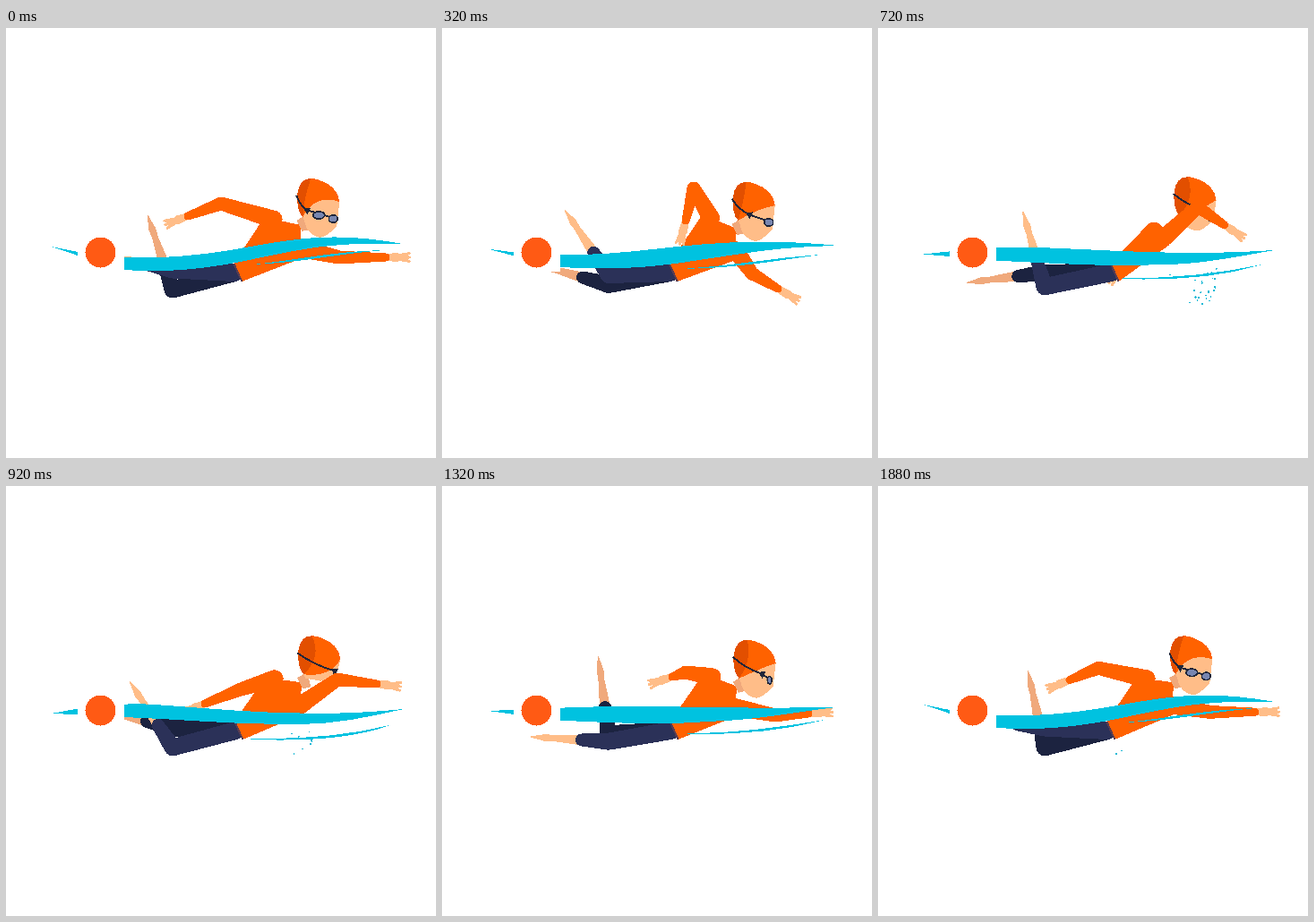
These frames come from a looping animation (480x480 px, 1920 ms). An HTML page:

```html
<!DOCTYPE html>
<html lang="en">
<head>
<meta charset="utf-8">
<title>Swimmer</title>
<style>
html, body { margin: 0; width: 100%; height: 100%; overflow: hidden; background: #fff; }
svg { display: block; width: 100%; height: 100%; }
</style>
</head>
<body>
<svg id="stage" viewBox="0 0 480 480" shape-rendering="crispEdges"></svg>
<script>
const LOOP = 1920, STEP = 40, TURN = 2 * Math.PI;
const ORANGE = '#ff6200', SHADE = '#e24f00', NAVY = '#2b3158', DARK = '#1c2340',
  SKIN = '#ffbd88', FAR_SKIN = '#f0a97c', WATER = '#00c2e0', INK = '#20263a';
const stage = document.getElementById('stage');

function add(tag, attrs, parent = stage) {
  const el = document.createElementNS('http://www.w3.org/2000/svg', tag);
  set(el, attrs);
  parent.appendChild(el);
  return el;
}
function set(el, attrs) {
  for (const key in attrs) el.setAttribute(key, attrs[key]);
}
const fill = (color, parent) => add('path', { fill: color }, parent);
const line = (color, width, parent) =>
  add('path', { fill: 'none', stroke: color, 'stroke-width': width }, parent);
const draw = (el, d) => el.setAttribute('d', d);
const mix = (a, b, k) => a + (b - a) * k;
const between = (a, b, k) => [mix(a[0], b[0], k), mix(a[1], b[1], k)];
const polygon = points => 'M' + points.join('L') + 'Z';

// Cosine swing that peaks at the given angle in degrees.
const swing = (phase, mean, size, peak) => mean + size * Math.cos(phase - peak * TURN / 360);

// The body bobs twice per stroke cycle; the two sides move half a cycle apart.
const sway = phase => swing(2 * phase, 0, 4, 245);
const headAt = phase => [350 + sway(phase), swing(2 * phase, 192, 3, 110)];
const hipEdge = phase => [[256 + sway(phase), 263], [265 + sway(phase), 283]];
const shoulderAt = phase => [swing(phase, 314, 17, 205), swing(phase, 230, 20, 215)];

// Tapered limb: a disc at each joint, joined by quads.
function limb(points, radii) {
  let d = '';
  points.forEach(([x, y], i) => {
    const r = radii[i];
    d += `M${x - r} ${y}a${r} ${r} 0 1 0 ${2 * r} 0a${r} ${r} 0 1 0 ${-2 * r} 0Z`;
    if (i === points.length - 1) return;
    const [X, Y] = points[i + 1], R = radii[i + 1], len = Math.hypot(X - x, Y - y) || 1;
    const nx = (y - Y) / len, ny = (X - x) / len;
    d += polygon([[x + nx * r, y + ny * r], [X + nx * R, Y + ny * R],
      [X - nx * R, Y - ny * R], [x - nx * r, y - ny * r]]);
  });
  return d;
}

// Periodic spline through one value per beat of the stroke.
const BEATS = [0, 320, 560, 920, 1320, 1600];
function spline(values, time) {
  const n = BEATS.length;
  const value = i => values[(i + n) % n];
  const when = i => BEATS[(i + n) % n] + LOOP * Math.floor(i / n);
  let i = n - 1;
  while (BEATS[i] > time) i--;
  const span = when(i + 1) - when(i), u = (time - when(i)) / span;
  const slope = k => (value(k + 1) - value(k - 1)) / (when(k + 1) - when(k - 1)) * span;
  const p = value(i), q = value(i + 1), a = slope(i), b = slope(i + 1);
  return p + a * u + (3 * (q - p) - 2 * a - b) * u * u + (2 * (p - q) + a + b) * u ** 3;
}

// The hand continues the line of the forearm.
function makeArm(offset, elbowX, elbowY, wristX, wristY) {
  const hand = fill(SKIN), sleeve = fill(ORANGE);
  return (phase, time) => {
    const elbow = [spline(elbowX, time), spline(elbowY, time)];
    const wrist = [spline(wristX, time), spline(wristY, time)];
    const angle = Math.atan2(wrist[1] - elbow[1], wrist[0] - elbow[0]);
    const reach = (from, length, turn) =>
      [from[0] + length * Math.cos(angle + turn), from[1] + length * Math.sin(angle + turn)];
    const palm = reach(wrist, 12, 0);
    const fingers = [-.3, 0, .3].map(turn => limb([palm, reach(palm, 15, turn)], [3.4, 1.4]));
    draw(hand, limb([wrist, palm], [3.8, 5]) + fingers.join(''));
    draw(sleeve, limb([shoulderAt(phase + offset), elbow, wrist], [10, 7.5, 4.5]));
  };
}

// The knee bobs while the shin swings; lift is in degrees above straight back.
function makeLeg(offset, skin, cloth, lift, kick) {
  const shin = fill(skin), shorts = fill(cloth);
  return phase => {
    const hip = [257 + sway(phase), 273];
    const knee = [186, swing(phase + offset, 281, 11, 180)];
    const angle = swing(phase + offset, lift, kick, 117) * TURN / 360;
    const along = length => [knee[0] - length * Math.cos(angle), knee[1] - length * Math.sin(angle)];
    draw(shin, limb([35, 62, 71, 87].map(along), [5.6, 3.4, 4, .6]));
    draw(shorts, limb([hip, knee, along(30)], [10, 9.5, 7]));
  };
}

function makeTorso() {
  const panels = [0, 1, 2].map(() => fill(ORANGE)), waist = line('#5a3c50', 2);
  return phase => {
    const [top, bottom] = hipEdge(phase);
    const shoulders = [shoulderAt(phase), shoulderAt(phase + Math.PI)];
    shoulders.forEach(([x, y], i) =>
      draw(panels[i], polygon([top, [x - 8, y - 6], [x + 5, y + 9], bottom])));
    const [x, y] = headAt(phase);
    draw(panels[2], polygon([between(top, bottom, .5), shoulders[0], [x - 19, y + 29], shoulders[1]]));
    draw(waist, `M${top}L${bottom}`);
  };
}

function makeHead() {
  const group = add('g', {});
  const neck = fill(FAR_SKIN, group), face = fill(SKIN, group);
  const cap = fill(ORANGE, group), shade = fill(SHADE, group);
  const strap = line(INK, 2, group), clip = fill(INK, group);
  const lenses = [0, 1].map(() =>
    add('ellipse', { fill: '#7886b0', stroke: INK, 'stroke-width': 1.6, ry: 4.2 }, group));
  const back = 'C-22 16 -24 4 -23 -6Z';
  draw(neck, 'M-24 24L-13 17L-9 34L-18 36Z');
  return phase => {
    const facing = Math.cos(phase), hard = facing ** 3, away = Math.max(0, -facing) ** 3;
    const brim = `${4.5 - 8 * hard} ${9 - 15 * hard}`;
    const chin = 43 - 16 * away;
    const clipX = 3 - 15 * facing, clipY = 14 + clipX * .13;
    group.setAttribute('transform', `translate(${headAt(phase)})`);
    draw(face, `M-17 20Q${brim} 24 3L21 ${30 - 15 * away}Q9 ${chin} 2 ${chin}Q-12 ${chin - 3} -15 25Z`);
    draw(cap, `M-23 -6C-21 -22 -12 -26 2 -21C14 -17 23 -9 24 3Q${brim} -17 20${back}`);
    draw(shade, `M-23 -6C-21 -18 -16 -23 -8 -23Q${-6 - 10 * facing} 0 -17 20${back}`);
    draw(strap, `M-24 -4Q${clipX * .5 - 14} ${clipY * .6} ${clipX} ${clipY}L17 21`);
    draw(clip, polygon([[clipX - 4, clipY - 2], [clipX + 4, clipY - 3], [clipX, clipY + 5]]));
    const widths = [13 * (facing - .5), Math.min(5, 3.5 + 3 * facing)];
    widths.forEach((rx, i) => set(lenses[i], {
      cx: 1 + 16 * i, cy: 18 + 4 * i, rx: Math.max(0, rx), display: rx > .3 ? 'inline' : 'none'
    }));
  };
}

// Both water shapes swing between a crest and a trough.
function makeWave(crest, trough) {
  const shape = fill(WATER), low = trough.match(/\d+/g);
  return phase => {
    const k = (1 - Math.cos(phase)) / 2;
    let i = 0;
    draw(shape, crest.replace(/\d+/g, n => mix(+n, +low[i++], k).toFixed(2)));
  };
}

function makeSplash(start, length, drift) {
  let seed = start;
  const random = () => (seed = (seed * 16807) % 2147483647) / 2147483647;
  random();
  const dots = Array.from({ length: 48 }, () => ({
    x: 349 + 57 * Math.sqrt(random()), y: 272 + 40 * random(), r: .6 + .6 * random(),
    born: .25 * Math.sqrt(random()), dies: .34 + .6 * random() ** 2
  }));
  const shape = fill('#19b9d6');
  return (phase, time) => {
    const k = (time - start + LOOP) % LOOP / length;
    const slide = Math.max(0, k - .33);
    draw(shape, dots.filter(p => k > p.born && k < p.dies)
      .map(p => limb([[p.x - drift * slide, p.y - 20 * slide]], [p.r])).join(''));
  };
}

const parts = [
  makeArm(Math.PI,
    [372, 346, 316, 262, 272, 332], [256, 274, 266, 227, 208, 222],
    [424, 375, 329, 222, 257, 350], [256, 291, 280, 243, 213, 229]),
  makeLeg(Math.PI, FAR_SKIN, DARK, 46, 56),
  makeLeg(0, SKIN, NAVY, 32, 44),
  makeTorso(),
  makeHead(),
  makeArm(0,
    [240, 281, 338, 370, 372, 338], [196, 179, 189, 216, 256, 272],
    [203, 272, 352, 414, 409, 376], [210, 215, 221, 221, 254, 288]),
  makeWave(
    'M51 244C110 258 170 261 250 248C320 236 360 226 443 241C370 239 340 245 290 255C220 271 175 273 132 270C100 262 75 252 51 244Z',
    'M51 254C90 246 130 240 180 245C250 250 340 260 444 249C400 259 360 268 310 266C250 266 190 260 132 258C100 256 75 255 51 254Z'),
  makeWave(
    'M275 264C320 260 365 249 422 248C370 252 330 262 275 264Z',
    'M273 282C330 283 380 279 429 267C385 283 330 285 273 283Z'),
  makeSplash(300, 800, 140),
  makeSplash(1480, 480, 250)
];
add('rect', { x: 80, y: 224, width: 52, height: 48, fill: '#fff' });
add('circle', { cx: 105.5, cy: 250.5, r: 17, fill: '#ff5a14' });

const begin = performance.now();
function render(now) {
  const time = Math.floor(Math.max(0, now - begin) % LOOP / STEP) * STEP;
  parts.forEach(part => part(TURN * time / LOOP, time));
  requestAnimationFrame(render);
}
render(begin);
</script>
</body>
</html>
```
